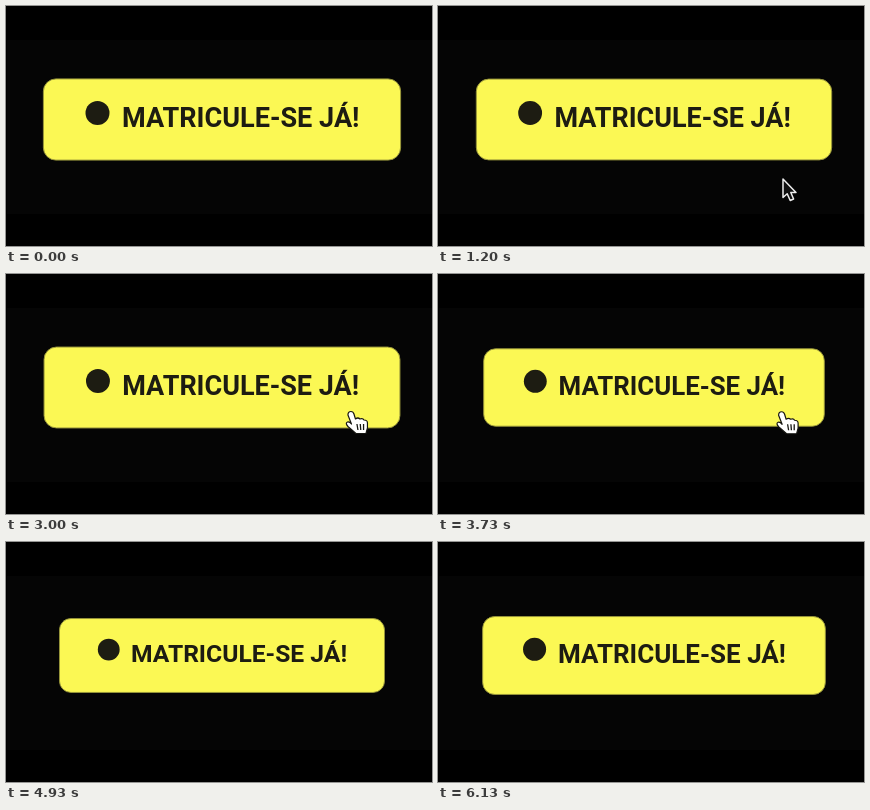
An HTML page for the animation above (6190 ms loop, 426 by 240 pixels).

```html
<!DOCTYPE html>
<html lang="pt-BR">
<head>
<meta charset="utf-8">
<title>Botão pulsante</title>
<style>
  html, body { margin: 0; width: 100%; height: 100%; overflow: hidden; background: #000; }
  svg { display: block; width: 100vw; height: 100vh; }
  text { font: 700 27.1px Roboto, Arial, sans-serif; }
</style>
</head>
<body>
<svg viewBox="0 0 426 240">
  <clipPath id="screen"><rect x="1" y="34" width="425" height="174"/></clipPath>
  <rect x="1" y="34" width="425" height="174" fill="#050505"/>
  <g id="button" fill="#1d1c12">
    <rect x="-178.6" y="-40.6" width="357.2" height="81.2" rx="12.5" fill="#fbf854" stroke="#99973c"/>
    <circle cx="-124.5" cy="-6.5" r="12"/>
    <text x="18.7" y="7.6" text-anchor="middle">MATRICULE-SE JÁ!</text>
  </g>
  <g clip-path="url(#screen)">
    <g id="cursor" stroke-linejoin="round">
      <path id="arrow" d="M0 0V18.5L4.2 14.8L7.2 21.5L10.6 20L7.8 13.5H13Z"
            fill="#111" stroke="#eee" stroke-width="1.5"/>
      <g id="hand">
        <path d="M-3 4Q-3 .5 0 .5Q2.3 .5 3 3L4.5 8Q7 6 9 8Q12 7 13 9Q16.5 9 16.5 12V17L15 22.5H5L-3 15.5Q-6 12-3.5 11Q-1.5 10.5 .5 13Z"
              fill="#fff" stroke="#161612" stroke-width="1.2"/>
        <path d="M6 13L7 19M9.3 13L9.8 19M12.6 13V19" fill="none" stroke="#161612" stroke-width="1.3"/>
      </g>
    </g>
  </g>
</svg>
<script>
const LOOP = 6190, STEP = 200 / 3;
const PULSE = 1415, LOW = 700, MIN_SCALE = 1 / 1.1;
const CENTER_Y = 113.5, HALF_HEIGHT = 41;
// time, x, y of the pointer
const PATH = [
  [800, 350, 212], [1200, 345, 173], [1600, 346, 138], [2200, 346, 137],
  [3730, 344, 137], [4000, 312, 158], [4400, 227, 185], [4670, 190, 212]
];
const $ = id => document.getElementById(id);
const show = (el, on) => el.setAttribute("visibility", on ? "visible" : "hidden");
const bezier = (a, b, s) => 3 * a * s * (1 - s) ** 2 + 3 * b * s * s * (1 - s) + s ** 3;

// CSS "ease"
function ease(x) {
  let lo = 0, hi = 1;
  for (let i = 0; i < 24; i++) {
    const mid = (lo + hi) / 2;
    if (bezier(.25, .25, mid) < x) lo = mid; else hi = mid;
  }
  return bezier(.1, 1, lo);
}

function pulse(t) {
  const phase = ((t - LOW) / PULSE % 1 + 1) % 1;
  return MIN_SCALE + (1 - MIN_SCALE) * ease(1 - Math.abs(2 * phase - 1));
}

function pointer(t) {
  const i = PATH.findIndex(p => p[0] > t);
  if (i < 1) return null;
  const [a, b] = [PATH[i - 1], PATH[i]];
  const k = (t - a[0]) / (b[0] - a[0]);
  return [1, 2].map(j => a[j] + (b[j] - a[j]) * k);
}

function draw(t) {
  const scale = pulse(t), pos = pointer(t);
  $("button").setAttribute("transform", `translate(216 ${CENTER_Y}) scale(${scale})`);
  const over = pos && pos[1] < CENTER_Y + HALF_HEIGHT * scale;
  show($("arrow"), pos && !over);
  show($("hand"), over);
  if (pos) $("cursor").setAttribute("transform", `translate(${pos})`);
}

const start = performance.now();
function tick() {
  const t = (performance.now() - start) % LOOP;
  draw(Math.floor((t + 4) / STEP) * STEP);
  requestAnimationFrame(tick);
}
tick();
</script>
</body>
</html>
```
